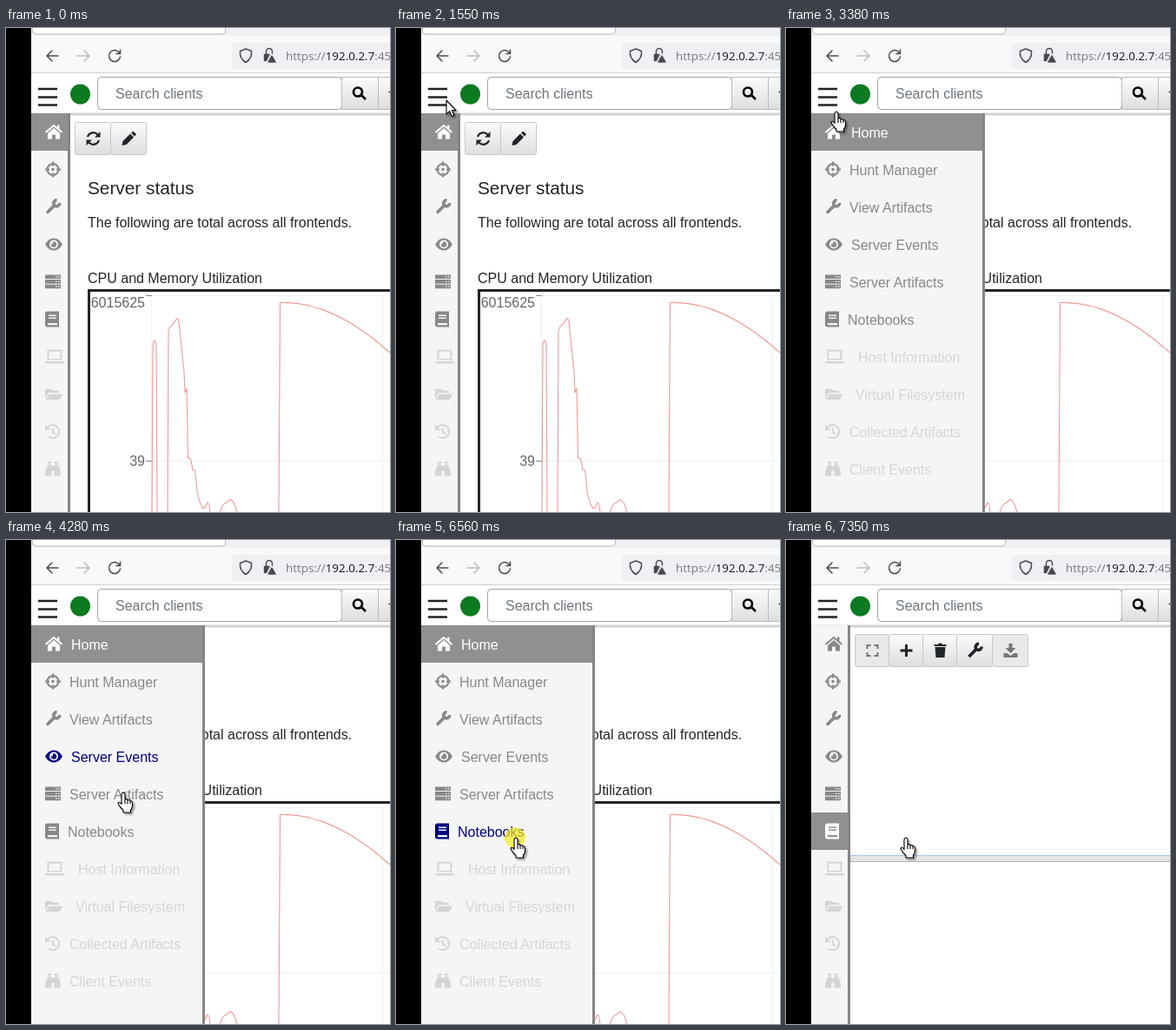
Animation, 442 px wide and 556 px high, one loop 8 s. Source, as an HTML page:

```html
<!DOCTYPE html>
<html lang="en">
<head>
<meta charset="utf-8">
<title>Sidebar menu</title>
<style>
html, body { margin: 0; width: 100%; height: 100%; overflow: hidden; background: #fff }
svg { display: block }
text { font: 16px "Liberation Sans", Arial, sans-serif; fill: #212529 }
.url { font: 13.4px "Open Sans", "Noto Sans", sans-serif; fill: #77777f }
.line { fill: none; stroke: #ef9a93; stroke-width: 1.1 }
.row { color: #888 }
.row text { fill: currentColor }
.row.off { color: #d5d5d5 }
.row.hover { color: #00007f }
.row.active { color: #fff }
.row rect { fill: none }
.row.active rect { fill: #909090 }
.cursor { fill: #fff; stroke: #000; stroke-width: 1.1; stroke-linejoin: round; filter: drop-shadow(2px 2px 1px #0006) }
</style>
</head>
<body>
<svg id="stage" width="442" height="556" viewBox="0 0 442 556">
  <defs>
    <linearGradient id="btn" x2="0" y2="1"><stop stop-color="#fbfbfb"/><stop offset="1" stop-color="#dedede"/></linearGradient>
  </defs>
  <rect width="442" height="556" fill="#fff"/>

  <!-- browser bar -->
  <rect width="442" height="9" fill="#f0f0f4"/>
  <rect x="30.5" y="-10" width="222" height="17" rx="4" fill="#fff" stroke="#b8b8bc"/>
  <rect y="9" width="442" height="42" fill="#f9f9fb"/>
  <rect y="51" width="442" height="1" fill="#cfcfd4"/>
  <rect x="260" y="17" width="200" height="30" rx="4" fill="#f0f0f4"/>
  <g fill="none" stroke="#4a4a52" stroke-width="1.5" stroke-linecap="round" stroke-linejoin="round">
    <path d="M60 32H47M53 26L47 32L53 38"/>
    <path d="M82 32H96M90 26L96 32L90 38" stroke="#bcbcc2"/>
    <path d="M130.500 28.500A6.500 6.500 0 1 0 131.500 33M131.500 25V29.500H127"/>
    <path d="M276 24L282.500 26.500Q283.500 35 276 39.500Q268.500 35 269.500 26.500Z"/>
    <path d="M299.500 30V27A3.500 3.500 0 0 1 306.500 27V29"/>
    <path d="M297.500 30.500H303L299.500 37.500H297.500Z" fill="#4a4a52"/>
    <path d="M306 32L310 39H302Z" fill="#4a4a52"/>
  </g>
  <text class="url" x="322" y="37">https://<tspan fill="#15141a">192.0.2.7</tspan>:45</text>

  <!-- page header -->
  <rect x="29" y="97.500" width="413" height="3" fill="#d3d3d3"/>
  <path d="M37 70H59M37 79.500H59M37 88.500H59" stroke="#222" stroke-width="2.300"/>
  <circle cx="85.500" cy="76" r="11.500" fill="#0b7a20"/>
  <rect x="105.500" y="56.500" width="281" height="37" rx="4" fill="#fff" stroke="#a2a2a2"/>
  <text x="126" y="81" style="fill:#6c757d">Search clients</text>
  <g fill="url(#btn)" stroke="#bbb">
    <rect x="386.500" y="56.500" width="42" height="37"/><rect x="428.500" y="56.500" width="40" height="37"/>
  </g>
  <path d="M440 73H450L445 78Z" fill="#222"/>
  <g id="find"></g>

  <g id="dash">
    <g id="dashBar"></g>
    <text x="94" y="191" style="font-size:20.8px">Server status</text>
    <text x="94" y="229">The following are total across all frontends.</text>
    <text x="94" y="293">CPU and Memory Utilization</text>
    <rect x="95.500" y="301.500" width="400" height="300" fill="none" stroke="#212529" stroke-width="3"/>
    <path d="M167.500 307V556M433.500 307V556M167 307.500H442M167 497.500H442" stroke="#f0f0f0"/>
    <path d="M161 307.500H168M161 497.500H168" stroke="#888"/>
    <g text-anchor="end" style="--c:#666">
      <text x="160" y="321" style="fill:#666">6015625</text>
      <text x="160" y="503" style="fill:#666">39</text>
    </g>
    <path class="line" d="M168 557L169 364Q171 353 173 365L174 557M186 557L187 348Q188 343 192 340L197 333.500Q199 333 200 347L205 395L206 419L208 414L209.500 494Q212 493 213 497L215 508H217.500Q219 520 220 532Q223 548 227 552Q230 551 232 545Q234 545 235 557M246 557Q249 546 254 545L258 541.500Q263 543 266 557M314 557L315.500 315.500Q376 313 443 374"/>
  </g>

  <g id="notes">
    <g id="notesBar"></g>
    <rect x="74" y="362.500" width="370" height="7" fill="#e4e4e4" stroke="#b5b5b5"/>
    <path d="M74 362.500H442" stroke="#a9c4ea"/>
  </g>

  <rect id="edge" y="98" width="3" height="458" fill="#858585"/>
  <svg id="side" x="29" y="98" height="458"><rect width="200" height="458" fill="#f5f5f5"/></svg>
  <rect width="29" height="556"/>

  <circle id="click" r="12" fill="#f6ec1c" opacity=".7"/>
  <path id="arrow" class="cursor" d="M0 0V16L3.800 12.600L6.200 18.400L8.800 17.300L6.400 11.600H11Z"/>
  <path id="hand" class="cursor" d="M-1 2Q1 -2 3 2V8Q5 6.500 6 9Q8 7.500 9 10Q11 9 11.500 12V15Q11.500 18 9.500 20V23H1V20.500Q-3 17 -5 12.500Q-4 9.500 -1 13.500ZM3 8V13M6 9V13M9 10V13"/>
</svg>
<script>
const $ = id => document.getElementById(id);

// each icon: filled path, stroked path, stroke width
const ICONS = {
  home: ["M-7 1.500L0-4.500L7 1.500V8H2V3H-2V8H-7ZM4-8H6.500V-3L4-5Z", "M-9.500 .500L0-7.500L9.500 .500", 2],
  target: ["M-1.500-1.500H1.500V1.500H-1.500Z", "M-6.500 0A6.500 6.500 0 1 1 6.500 0A6.500 6.500 0 1 1-6.500 0M0-9V-4M0 9V4M-9 0H-4M9 0H4", 2.2],
  wrench: ["", "M-7 7L2.500-2.500M4.500-7.500A3.400 3.400 0 1 0 7.500-4.500", 3.7],
  eye: ["M-10 0Q-6-7 0-7T10 0Q6 7 0 7T-10 0ZM-5 0A5 5 0 0 0 5 0A5 5 0 0 0-5 0ZM-3.200 0A3.200 3.200 0 0 0 3.200 0A3.200 3.200 0 0 0-1-3Q0 0-3.200 0Z"],
  server: [[-8, -2.4, 3.2].map(y => `M-9 ${y}H9V${y + 4.6}H-9ZM3 ${y + 1.6}V${y + 3}H4.500V${y + 1.6}ZM6 ${y + 1.6}V${y + 3}H7.500V${y + 1.6}Z`).join("")],
  book: ["M-5-9H8V9H-5Q-8 9-8 6V-6Q-8-9-5-9ZM-4-5V-3.600H5V-5ZM-4-2V-.600H5V-2ZM-5 4.500H6V6.700H-5Z"],
  laptop: ["M-8.500-8H8.500V4H-8.500ZM-6.500-6V2.500H6.500V-6ZM-11 5.500H11Q11 8 9 8H-9Q-11 8-11 5.500Z"],
  folder: ["M-10 5V-6H-3L-1-4H6V-1.500H-6ZM-9.500 6.500L-5 0H10.500L6.500 6.500Z"],
  history: ["M-9-8V-1.500H-2.500Z", "M-6-5A7.500 7.500 0 1 1-5 6M0-4V1L3 3", 2],
  binoculars: ["M-6-5H-1.500V8H-9V3ZM6-5H1.500V8H9V3ZM-6-8.500H-2V-6H-6ZM6-8.500H2V-6H6ZM-1.500-3H1.500V2H-1.500Z"],
  search: ["", "M-7-1.500A5 5 0 1 1 3-1.500A5 5 0 1 1-7-1.500M2 2L7 7", 2.6],
  refresh: ["M8-8V-1.500H1.500ZM-8 8V1.500H-1.500Z", "M-6.500-2A6.700 6.700 0 0 1 5-4.500M6.500 2A6.700 6.700 0 0 1-5 4.500", 2.2],
  pencil: ["M-8 8L-7 3L1.500-5.500L5.500-1.500L-3 7ZM2.500-6.500L5-8.500L8.500-5L6.500-2.500Z"],
  expand: ["", "M-6-2V-6H-2M2-6H6V-2M6 2V6H2M-2 6H-6V2", 2],
  plus: ["", "M-7 0H7M0-7V7", 3],
  trash: ["M-7-7H-2.500L-1.500-8.500H1.500L2.500-7H7V-5H-7ZM-6-4H6L5 8H-5Z"],
  download: ["M-2-8H2V-3H6L0 3L-6-3H-2ZM-8 3H-4L0 6L4 3H8V8H-8Z"]
};
const icon = (name, x, y) => {
  const [fill, stroke = "", width = 0] = ICONS[name];
  return `<g transform="translate(${x} ${y})"><path d="${fill}" fill="currentColor" fill-rule="evenodd"/>` +
    `<path d="${stroke}" fill="none" stroke="currentColor" stroke-width="${width}"/></g>`;
};

// toolbar from edge positions, icon names and indexes of disabled buttons
const toolbar = (edges, names, off = []) => names.map((name, i) => {
  const x = edges[i], w = edges[i + 1] - x, dim = off.includes(i);
  return `<g color="${dim ? "#777" : "#212529"}"><rect x="${x - .5}" y="108.500" width="${w}" height="37" rx="2" ` +
    `fill="${dim ? "#e9e9e9" : "url(#btn)"}" stroke="#c8c8c8"/>${icon(name, x + w / 2, 127)}</g>`;
}).join("");

$("find").innerHTML = icon("search", 407, 75);
$("dashBar").innerHTML = toolbar([80, 121, 162], ["refresh", "pencil"]);
$("notesBar").innerHTML = toolbar([80, 119, 158, 197, 238, 279], ["expand", "plus", "trash", "wrench", "download"], [0, 4]);

const ROW = 43, TOP = 98;
const MENU = [
  ["home", "Home", 75], ["target", "Hunt Manager", 73], ["wrench", "View Artifacts", 73],
  ["eye", "Server Events", 75], ["server", "Server Artifacts", 73], ["book", "Notebooks", 71],
  ["laptop", "Host Information", 83], ["folder", "Virtual Filesystem", 80],
  ["history", "Collected Artifacts", 73], ["binoculars", "Client Events", 73]
];
const iconX = { home: 26, eye: 26, book: 24, laptop: 27, folder: 26 };
$("side").innerHTML += MENU.map(([name, label, x], i) =>
  `<g class="row" transform="translate(0 ${i * ROW})"><rect width="200" height="${ROW}"/>` +
  icon(name, iconX[name] || 25, 21.5) + `<text x="${x - 29}" y="28">${label}</text></g>`).join("");
const rows = [...document.querySelectorAll(".row")];

// pointer path: time, x, y
const PATH = [
  [410, 290, 575], [840, 156, 300], [1280, 70, 127], [1550, 58, 83], [1820, 42, 77], [2950, 42, 77],
  [3380, 57, 96], [3790, 99, 172], [4280, 134, 290], [4630, 139, 340], [4770, 137, 342], [8000, 137, 342]
];
const pointer = t => {
  const i = PATH.findIndex(p => p[0] > t);
  if (i < 1) return PATH[0].slice(1);
  const [t0, x0, y0] = PATH[i - 1], [t1, x1, y1] = PATH[i], k = (t - t0) / (t1 - t0);
  return [x0 + (x1 - x0) * k, y0 + (y1 - y0) * k];
};

// the CSS "ease" curve
const ease = p => {
  if (p <= 0 || p >= 1) return p <= 0 ? 0 : 1;
  const bez = (u, a, b) => 3 * u * (1 - u) ** 2 * a + 3 * u * u * (1 - u) * b + u ** 3;
  let lo = 0, hi = 1;
  for (let i = 0; i < 20; i++) {
    const mid = (lo + hi) / 2;
    if (bez(mid, .25, .25) < p) lo = mid; else hi = mid;
  }
  return bez(lo, .1, 1);
};

const OPEN = 2290, CHOOSE = 6750, SLIDE = 500, STEP = 70;
const show = (id, on) => $(id).style.display = on ? "" : "none";
const place = (id, [x, y]) => $(id).setAttribute("transform", `translate(${x} ${y})`);

function draw(t) {
  const chosen = t >= CHOOSE;
  const edge = 71 + 155 * (ease((t - OPEN) / SLIDE) - ease((t - CHOOSE) / SLIDE));
  $("edge").setAttribute("x", edge);
  $("side").setAttribute("width", edge - 29);
  show("dash", !chosen);
  show("notes", chosen);

  // the highlight trails the pointer a little
  const over = t > 3020 && !chosen ? Math.floor((pointer(t - 180)[1] - TOP) / ROW) : -1;
  rows.forEach((row, i) => {
    const state = i === (chosen ? 5 : 0) ? "active" : i > 5 ? "off" : i === over ? "hover" : "";
    row.setAttribute("class", "row " + state);
  });

  const pos = pointer(Math.floor((t - 10) / STEP) * STEP + 10).map(Math.round);
  const hand = t >= 2150;
  place("arrow", pos);
  place("hand", pos);
  place("click", pos);
  show("arrow", t >= 480 && !hand);
  show("hand", hand);
  show("click", (t >= 2150 && t < 2340) || (t >= 6560 && !chosen));
}

const start = performance.now();
(function tick() {
  draw((performance.now() - start) % 8000);
  requestAnimationFrame(tick);
})();
</script>
</body>
</html>
```
